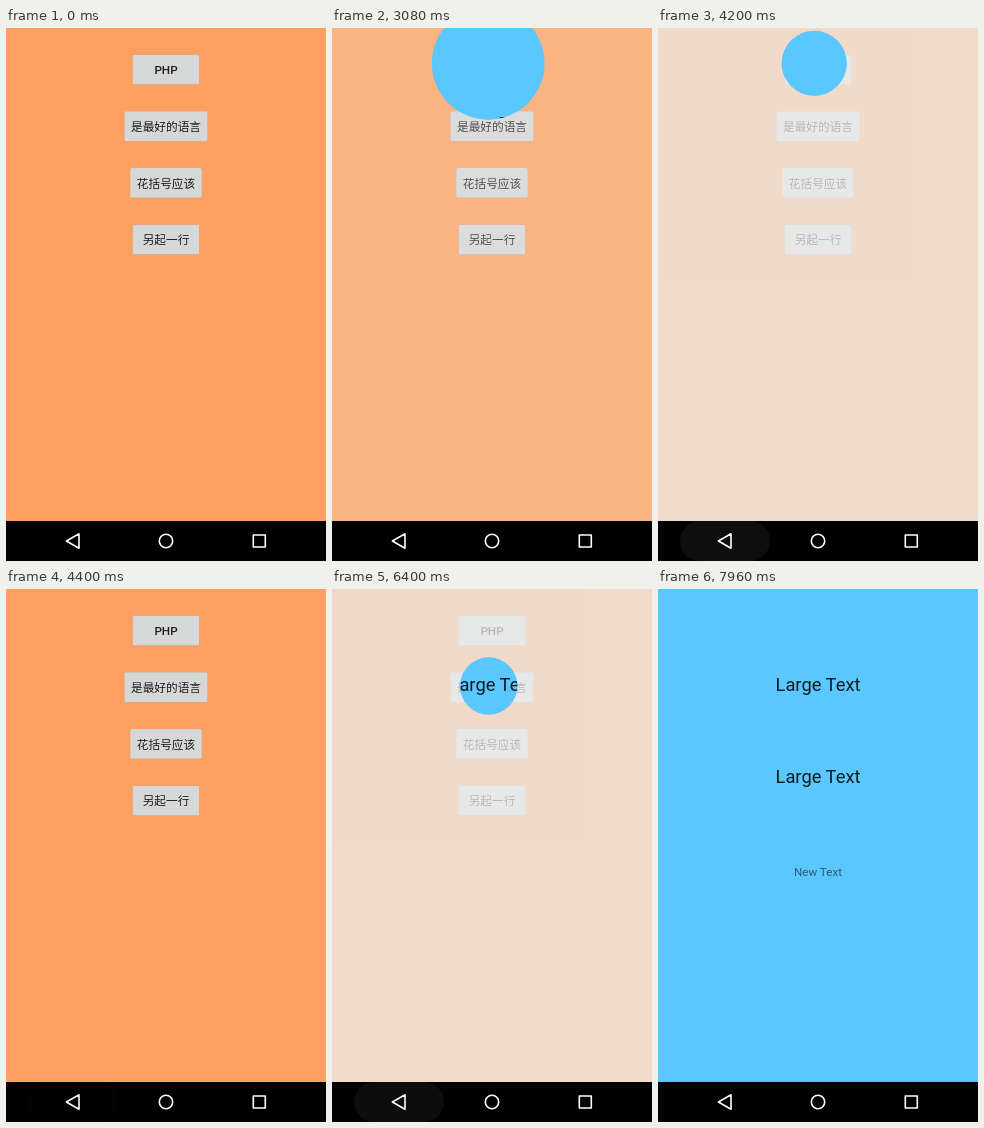
Write an HTML page that moves like this. It is 320x533 px and loops after 8 s.

```html
<!DOCTYPE html>
<html lang="zh-CN">
<head>
<meta charset="utf-8">
<title>Circular reveal</title>
<style>
  html, body { margin: 0; width: 100%; height: 100%; overflow: hidden; background: #000; }
  svg { display: block; width: 100%; height: 100%; }
  text { font-family: Roboto, "Noto Sans CJK SC", "Noto Sans CJK", sans-serif; text-anchor: middle; fill: #000; }
  .button rect { fill: #d6d7d7; filter: drop-shadow(0 .8px .7px rgba(0, 0, 0, .28)); }
  .button text { font-size: 11.67px; fill-opacity: .87; }
  .latin { font-weight: 500; }
  .large { font-size: 18.33px; fill-opacity: .87; }
  .small { font-size: 11.67px; fill-opacity: .54; }
  .icons { fill: none; stroke: #fff; stroke-width: 1.6; stroke-linejoin: round; }
</style>
</head>
<body>
<svg viewBox="0 0 320 533" preserveAspectRatio="none">
  <defs>
    <clipPath id="hole"><circle id="circle" r="0"/></clipPath>
  </defs>
  <rect width="320" height="493" fill="#eee"/>
  <g id="list">
    <rect width="320" height="493" fill="#ffa060"/>
  </g>
  <g id="detail" clip-path="url(#hole)">
    <rect width="320" height="493" fill="#5ac8ff"/>
    <text class="large" x="160" y="102.3">Large Text</text>
    <text class="large" x="160" y="194.3">Large Text</text>
    <text class="small" x="160" y="286.7">New Text</text>
  </g>
  <rect y="493" width="320" height="40"/>
  <rect id="ripple" y="493" height="40" rx="20" fill="#fff"/>
  <g class="icons">
    <path d="M60.4 513 L73 505.8 V520.2 Z"/>
    <circle cx="160" cy="513" r="6.7"/>
    <rect x="247.3" y="507" width="12" height="12"/>
  </g>
</svg>
<script>
const LOOP = 8000, STEP = 40, W = 320, H = 493;
const $ = id => document.getElementById(id);
const clamp = v => Math.min(1, Math.max(0, v));
const ease = v => (1 - Math.cos(Math.PI * clamp(v))) / 2;

// label, button width
const BUTTONS = [['PHP', 66.7], ['是最好的语言', 83.3], ['花括号应该', 71.7], ['另起一行', 66.7]];

// show: first visible change; open/fade: start times; back: tap; shut: collapse start
const VISITS = [
  { x: 156.2, y: 35.3, show: 3080, open: 3023, span: 258, fade: 2980, back: 3900, shut: 3950 },
  { x: 156.7, y: 97, show: 5280, open: 5210, span: 300, fade: 5210, back: 6080, shut: 6150 },
  { x: 163.2, y: 157.5, show: 7320, open: 7236, span: 300, fade: 7236, back: Infinity, shut: Infinity }
];

function svg(parent, tag, attrs) {
  const el = document.createElementNS('http://www.w3.org/2000/svg', tag);
  for (const key in attrs) el.setAttribute(key, attrs[key]);
  return parent.appendChild(el);
}

function set(el, attrs) {
  for (const key in attrs) el.setAttribute(key, attrs[key]);
}

BUTTONS.forEach(([label, width], i) => {
  const y = 26.67 + i * 56.67;
  const g = svg($('list'), 'g', { class: 'button' });
  svg(g, 'rect', { x: 160 - width / 2, y, width, height: 29.8, rx: 1.67 });
  const text = svg(g, 'text', { x: 160, y: y + (i ? 19.6 : 19.3), class: i ? '' : 'latin' });
  text.textContent = label;
});

function draw(t) {
  const v = VISITS.filter(visit => t >= visit.show).pop();
  let radius = 0, alpha = 1, glow = 0, spread = 0;
  if (v) {
    // distance to the farthest corner
    const full = Math.hypot(Math.max(v.x, W - v.x), Math.max(v.y, H - v.y)) + 1;
    const closing = t >= v.shut;
    radius = full * (closing ? 1 - ease((t - v.shut) / 300) : ease((t - v.open) / v.span));
    alpha = closing ? ease((t - v.shut - 150) / 300) : 1 - ease((t - v.fade) / 300);
    if (t >= v.back) {
      glow = 0.2 * (1 - clamp((t - v.back) / 640)) ** 2;
      spread = 45 * (1 - 400 ** (-1.4 * clamp((t - v.back) / 350)));
    }
    set($('circle'), { cx: v.x, cy: v.y });
  }
  set($('circle'), { r: radius });
  set($('detail'), { visibility: radius > 0.2 ? 'visible' : 'hidden' });
  set($('list'), { opacity: alpha });
  set($('ripple'), { x: 67 - spread, width: 2 * spread, 'fill-opacity': glow });
}

const start = performance.now();
function tick() {
  const t = (performance.now() - start) % LOOP;
  draw(Math.floor(t / STEP) * STEP);
  requestAnimationFrame(tick);
}
tick();
</script>
</body>
</html>
```
